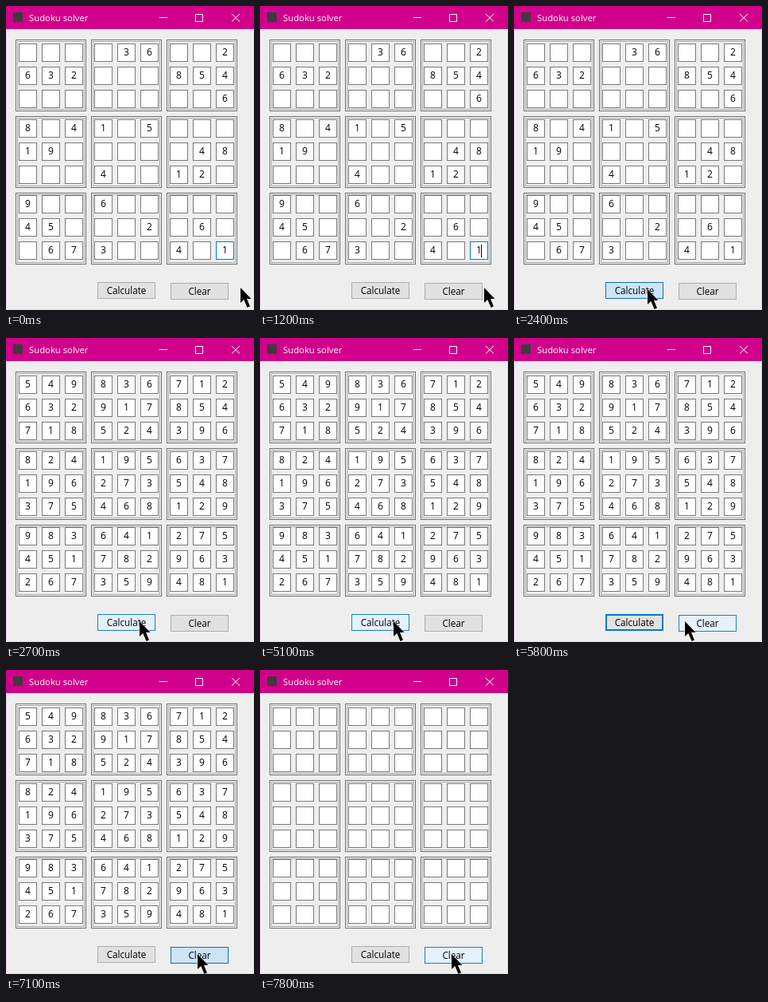
These frames come from a looping animation (312x381 px, 8.2 s). An HTML page:

```html
<!DOCTYPE html>
<html lang="en">
<head>
<meta charset="utf-8">
<title>Sudoku solver</title>
<style>
  * { box-sizing: border-box; }
  html, body { margin: 0; width: 100%; height: 100%; overflow: hidden; }
  #win {
    position: relative; width: 312px; height: 381px; overflow: hidden;
    background: #eee; color: #000; cursor: default;
    font: 12px "Open Sans", "Noto Sans", sans-serif;
  }
  #win::after { content: ""; position: absolute; inset: 29px 0 0; border: solid #f6d3f4; border-width: 0 1px 1px; }
  #win > * { position: absolute; }
  .bar { left: 0; top: 0; width: 312px; height: 29px; background: #d1008b; }
  .icon { left: 9px; top: 8px; width: 12px; height: 12px; background: #3c3c3c; }
  .title { left: 29px; top: 5px; font-size: 11.3px; line-height: 20px; color: #fff; white-space: pre; }
  .ctl { left: 0; top: 0; fill: none; stroke: #fff; }
  .box {
    width: 89px; height: 90px; border: 1px solid #6b6b6b;
    box-shadow: inset 0 0 0 1px #fff, inset 0 0 0 2px #a6a6a6;
  }
  .cell {
    width: 23px; height: 23px; border: 1px solid #7a7a7a; background: #fff;
    text-align: center; line-height: 20px;
  }
  .cell.focus { border-color: #0078d7; }
  #caret { left: 278px; top: 299px; width: 1px; height: 16px; background: #000; }
  .btn {
    width: 73px; height: 21px; background: #e1e1e1; text-align: center;
    font-size: 11.7px; line-height: 21px; box-shadow: inset 0 0 0 1px #adadad;
  }
  .btn.focus { box-shadow: inset 0 0 0 2px #0078d7; }
  .btn.hover { background: #e5f1fb; box-shadow: inset 0 0 0 1px #1c80c4; }
  .btn.press { background: #cce4f7; box-shadow: inset 0 0 0 1px #1a6ea8; }
  #calc { left: 115px; top: 346px; }
  #clear { left: 207px; top: 347px; }
  #mouse { left: 0; top: 0; z-index: 1; overflow: visible; }
</style>
</head>
<body>
<div id="win">
  <div class="bar"></div>
  <div class="icon"></div>
  <div class="title">Sudoku solver</div>
  <svg class="ctl" width="312" height="29">
    <path d="M193 14.5h10M238.5 10.5h9v9h-9zM284 10l10 9.500M294 10l-10 9.500"/>
  </svg>
  <div id="calc" class="btn">Calculate</div>
  <div id="clear" class="btn">Clear</div>
  <div id="caret"></div>
  <svg id="mouse" width="16" height="28">
    <path d="M0 0V19L4.300 15L8.500 25L12 23.500L8 14H13.500Z" stroke="#fff" stroke-width="1" paint-order="stroke"/>
  </svg>
</div>
<script>
const LOOP = 8200, STEP = 100;
const SOLVE = 2500, CLEAR = 7200, PRESS_CALC = 2300, PRESS_CLEAR = 7100;

const given = (
  "....36..2" + "632...854" + "........6" +
  "8.41.5..." + "19.....48" + "...4..12." +
  "9..6....." + "45...2.6." + ".673..4.1").replaceAll(".", " ");
const solved =
  "549836712" + "632917854" + "718524396" +
  "824195637" + "196273548" + "375468129" +
  "983641275" + "451782963" + "267359481";

const $ = id => document.getElementById(id);
const win = $("win"), calc = $("calc"), clear = $("clear"), caret = $("caret"), mouse = $("mouse");

function add(cls, x, y) {
  const el = document.createElement("div");
  el.className = cls;
  el.style.left = x + "px";
  el.style.top = y + "px";
  win.insertBefore(el, calc);
  return el;
}

for (let i = 0; i < 9; i++) add("box", 12 + 95 * (i % 3), 42 + 96 * Math.floor(i / 3));

// Offset of a row or column: 29px per cell, 95px per block of three.
const offset = n => 95 * Math.floor(n / 3) + 29 * (n % 3);
const cells = Array.from({ length: 81 }, (_, i) =>
  add("cell", 16 + offset(i % 9), 47 + offset(Math.floor(i / 9))));

const progress = (t, start) => Math.min(1, Math.max(0, (t - start) / 500));
const smooth = p => p * p * (3 - 2 * p);
const easeOut = p => 1 - (1 - p) ** 2;

// The pointer moves to Calculate, then on to Clear.
function pointer(t) {
  const a = smooth(progress(t, 1100)), b = easeOut(progress(t, 5600));
  return [Math.round(295 - 127 * a + 73 * b), Math.floor(353 + 2 * a + b)];
}

function setButton(el, [x, y], pressed, focused) {
  const dx = x - el.offsetLeft, dy = y - el.offsetTop;
  const over = dx >= 0 && dx < 73 && dy >= 0 && dy < 21;
  el.className = "btn" + (pressed ? " press" : over ? " hover" : focused ? " focus" : "");
}

function draw(t) {
  const pos = pointer(t);
  mouse.style.transform = `translate(${pos[0]}px, ${pos[1]}px)`;

  const digits = t < SOLVE ? given : t < CLEAR ? solved : "";
  cells.forEach((cell, i) => { cell.textContent = digits[i] || ""; });

  const editing = t < PRESS_CALC;
  cells[80].classList.toggle("focus", editing);
  caret.hidden = !editing || t < 200;

  setButton(calc, pos, t >= PRESS_CALC && t < SOLVE, t >= PRESS_CALC && t < PRESS_CLEAR);
  setButton(clear, pos, t >= PRESS_CLEAR && t < CLEAR, t >= PRESS_CLEAR);
}

let shown = -1;
function tick() {
  const t = Math.floor(performance.now() % LOOP / STEP) * STEP;
  if (t !== shown) draw(shown = t);
  requestAnimationFrame(tick);
}
tick();
</script>
</body>
</html>
```
